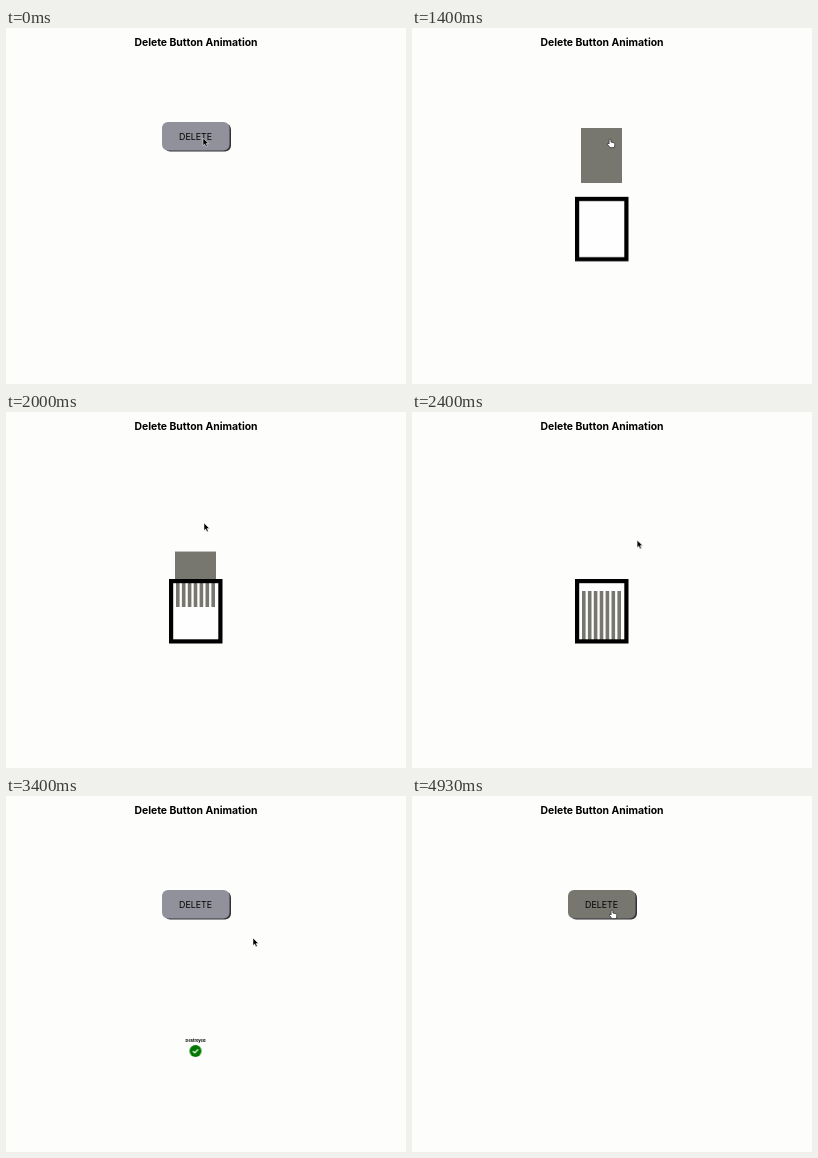
Write an HTML page that moves like this. It is 400x356 px and loops after 4990 ms.

```html
<!DOCTYPE html>
<html lang="en">
<head>
<meta charset="utf-8">
<title>Delete Button Animation</title>
<style>
  :root { --page: #fdfdfc; --idle: #91919b; --hover: #777770; }
  html, body { margin: 0; width: 100%; height: 100%; overflow: hidden; background: var(--page); }
  svg { display: block; }
  text { font-family: Inter, "Liberation Sans", sans-serif; text-anchor: middle; }

  .anim { animation: 4990ms linear infinite; }
  .button { animation-name: button; }
  .trim { animation-name: trim; }
  .bin { animation-name: bin; }
  .strips { animation-name: strips; }
  .done { animation-name: done; }
  .check { animation-name: check; }
  .cursor { animation-name: cursor; }
  .arrow { animation-name: arrow; animation-timing-function: step-end; }
  .hand { animation-name: hand; animation-timing-function: step-end; }

  /* button turns into a sheet, falls into the shredder, then comes back */
  @keyframes button {
    0%, 22.65% { x: 156px; y: 94px; width: 67.5px; height: 28.5px; rx: 6px; fill: var(--idle); opacity: 1; }
    24.05% { fill: var(--hover); }
    28.06%, 32.06% { x: 169px; y: 100px; width: 41px; height: 55px; rx: 0; }
    58.08%, 62.72% { x: 169px; y: 228px; width: 41px; height: 55px; rx: 0; fill: var(--hover); opacity: 1; }
    62.73% { x: 156px; y: 94px; width: 67.5px; height: 28.5px; rx: 6px; fill: var(--idle); opacity: 0; }
    68.14% { opacity: 1; }
    96% { fill: var(--idle); }
    97.4%, 100% { x: 156px; y: 94px; width: 67.5px; height: 28.5px; rx: 6px; fill: var(--hover); opacity: 1; }
  }
  @keyframes trim {
    0%, 22.65% { opacity: 1; }
    24.05%, 62.73% { opacity: 0; }
    68.14%, 100% { opacity: 1; }
  }
  @keyframes bin {
    0%, 22.65% { transform: translateY(-150px); opacity: 0; animation-timing-function: ease-in; }
    26.65% { transform: translateY(6px); opacity: 1; animation-timing-function: ease-out; }
    29.46%, 62.73% { transform: none; opacity: 1; }
    68.14%, 100% { transform: none; opacity: 0; }
  }
  @keyframes strips {
    0%, 32.06% { transform: none; }
    58.08%, 100% { transform: translateY(128px); }
  }
  @keyframes done {
    0%, 57.5% { transform: none; opacity: 0; }
    59.5%, 62.73% { transform: none; opacity: 1; }
    68.14%, 84.17% { transform: translateY(50px); opacity: 1; }
    85.5%, 100% { transform: translateY(50px); opacity: 0; }
  }
  @keyframes check {
    0%, 57.5% { transform: translate(189.5px, 244px) scale(0); opacity: 1; }
    60.5%, 62.73% { transform: translate(189.5px, 244px); }
    68.14%, 84.17% { transform: translate(189.5px, 255px); opacity: 1; }
    85.5%, 100% { transform: translate(189.5px, 255px); opacity: 0; }
  }
  @keyframes cursor {
    0%, 22.65% { transform: translate(197px, 110px); }
    24.05%, 41.48% { transform: translate(198px, 111px); }
    48.1% { transform: translate(225px, 128px); }
    50.7%, 94% { transform: translate(247px, 142px); }
    98.6%, 100% { transform: translate(200px, 114px); }
  }
  @keyframes arrow {
    0% { opacity: 1; }
    24.05% { opacity: 0; }
    36.07% { opacity: 1; }
    97.4%, 100% { opacity: 0; }
  }
  @keyframes hand {
    0% { opacity: 0; }
    24.05% { opacity: 1; }
    36.07% { opacity: 0; }
    97.4%, 100% { opacity: 1; }
  }
</style>
</head>
<body>
<svg width="400" height="356" viewBox="0 0 400 356">
  <text x="190" y="17.5" font-size="10.4" font-weight="650">Delete Button Animation</text>

  <!-- the sheet is cut off at the shredder's top edge -->
  <svg width="400" height="169">
    <rect class="anim trim" x="158" y="95.5" width="67" height="28" rx="6" fill="#333338"/>
    <rect class="anim button"/>
    <text class="anim trim" x="189.5" y="111.7" font-size="8.8">DELETE</text>
  </svg>

  <g class="anim bin">
    <rect x="165" y="169" width="49.5" height="60.5" fill="#fefefe"/>
    <svg x="167" y="171" width="45.5" height="57">
      <path class="anim strips" d="M3 -43.5h39" stroke="#777770" stroke-width="55" stroke-dasharray="3.6 2.3"/>
    </svg>
    <rect x="165.1" y="169.1" width="49.3" height="60.3" fill="none" stroke="#000" stroke-width="4.2"/>
  </g>

  <text class="anim done" x="189.5" y="195.6" font-size="3.95" font-weight="700">Destroyed</text>
  <g class="anim check">
    <circle r="6" fill="#007800"/>
    <path d="M-2.6 .1l1.8 1.8 3.4-3.5" fill="none" stroke="#fff" stroke-width="1.3"/>
  </g>

  <g class="anim cursor">
    <path class="anim arrow" d="M0 0v7.6l1.7-1.6 1.2 2.8 1.4-.6-1.2-2.7h2.4z" stroke="#fff" stroke-width=".5"/>
    <path class="anim hand" d="M-.9 .7q.9-1.3 1.8 0v2.4l3 .7q1 .3 .9 1.4l-.5 3.4h-4.2l-2.7-3.3q-.2-1.2 1.2-.8l.5 .5z" fill="#fff" stroke="#111" stroke-width=".6"/>
  </g>
</svg>
</body>
</html>
```
